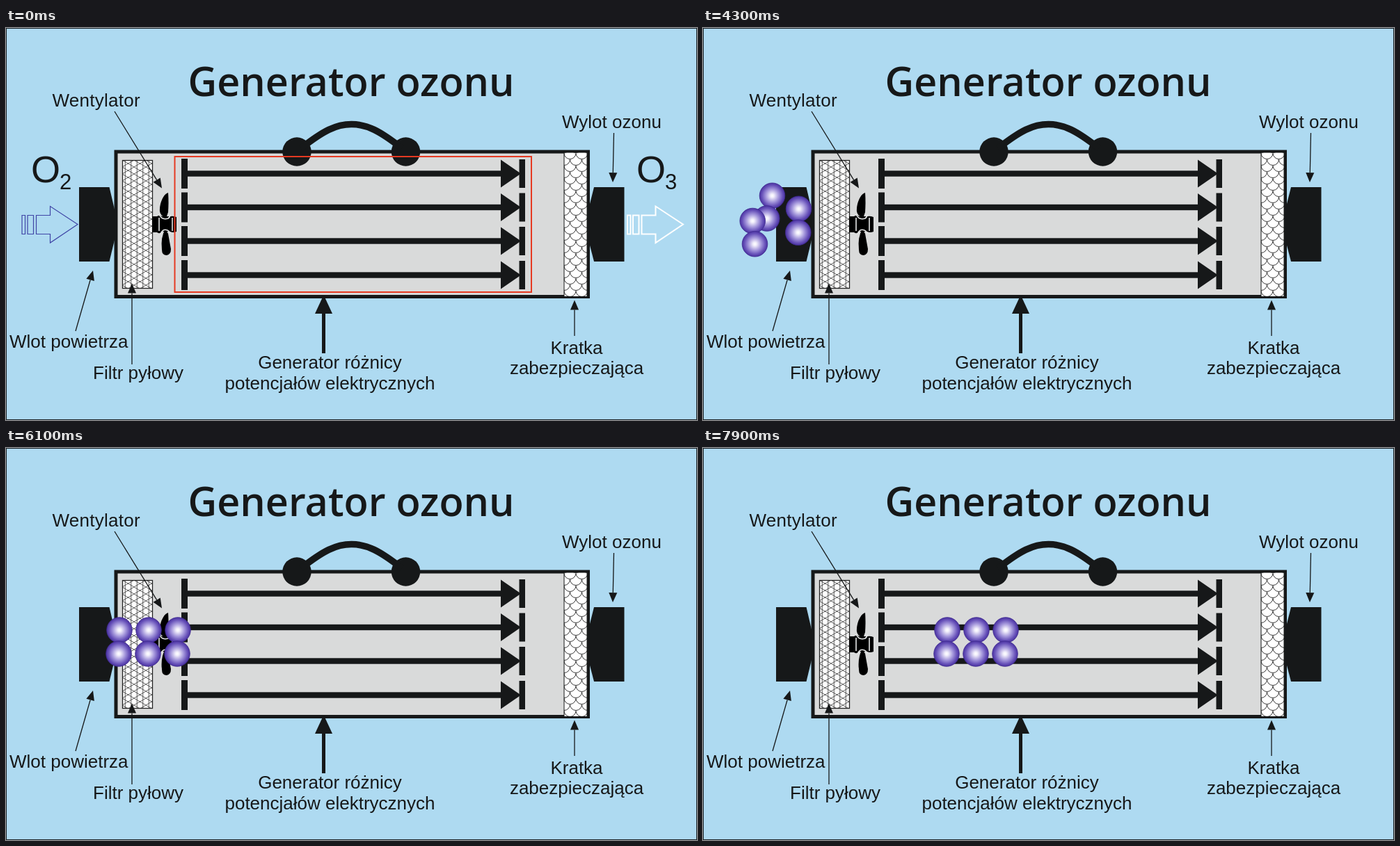
Recreate the animation shown at these times as an HTML page. Size 993 by 564 pixels, loop 8 s.

```html
<!DOCTYPE html>
<html lang="pl">
<head>
<meta charset="utf-8">
<title>Generator ozonu</title>
<style>
html, body { margin: 0; width: 100%; height: 100%; overflow: hidden; background: #aedaf1; }
svg { display: block; width: 993px; height: 564px; }
text { font: 26px "Liberation Sans", Arial, sans-serif; fill: #161819; white-space: pre; }
.title { font: 600 57.5px "Open Sans", "Noto Sans", sans-serif; }
.mid { text-anchor: middle; }
</style>
</head>
<body>
<svg viewBox="0 0 993 564">
  <defs>
    <radialGradient id="shade">
      <stop offset="0" stop-color="#fff"/>
      <stop offset=".14" stop-color="#f1eefb"/>
      <stop offset=".5" stop-color="#a598dc"/>
      <stop offset=".82" stop-color="#6650b8"/>
      <stop offset="1" stop-color="#4a32a0"/>
    </radialGradient>
    <pattern id="mesh" x="167" y="190" width="17" height="10" patternUnits="userSpaceOnUse">
      <path d="M0 0L17 10M0 10L17 0M4.25 0V10M12.75 0V10" stroke="#333" stroke-width=".8"/>
    </pattern>
    <pattern id="scales" x="802" y="180" width="17" height="18" patternUnits="userSpaceOnUse">
      <path d="M0 0A8.5 8.5 0 0 0 17 0M-8.5 9A8.5 8.5 0 0 0 8.5 9A8.5 8.5 0 0 0 25.5 9"
        fill="none" stroke="#222" stroke-width=".9"/>
    </pattern>
    <circle id="ball" r="18.3" fill="url(#shade)" stroke="#3f2a90" stroke-width=".8"/>
    <path id="flow" d="M23 269.5h4.5v27h-4.5zM31 269.5h8.500v27h-8.500zM43.500 269.500H63.500V256.500L103 282.500L63.500 309V296.500H43.500z" fill="none"/>
  </defs>

  <rect width="993" height="564" fill="#aedaf1"/>
  <rect x=".5" y=".5" width="992" height="563" fill="none" stroke="#1c2328"/>

  <g fill="#161819">
    <path d="M105 229H148.500L156 261V305L148.500 336H105z"/>
    <path d="M888.500 229H845L837 261V305L845 336H888.500z"/>
  </g>
  <rect x="158" y="178" width="678.500" height="208.500" fill="#d9dada" stroke="#161819" stroke-width="5"/>

  <rect x="802" y="179" width="33" height="207.500" fill="#fff"/>
  <rect x="802" y="179" width="33" height="207.500" fill="url(#scales)" stroke="#161819"/>
  <rect x="167.500" y="190.500" width="43" height="184" fill="#fff"/>
  <rect x="167.500" y="190.500" width="43" height="184" fill="url(#mesh)" stroke="#222" stroke-width="1.300"/>

  <g>
    <path d="M210 271H217Q221 268 224 271H236Q240 270 245 272V293Q240 295 236 293H224Q221 297 217 294H210z"/>
    <path d="M233 237C227 238 220 252 221 264Q222 270 230 274L233 265Q234 250 233 237z"/>
    <path d="M229 289Q222 301 224 319Q224 327 231 327Q237 326 237 318L233 296z"/>
    <path d="M220 268Q224 277 233 274Q236 272 236 268M222 297Q225 288 232 291Q236 293 236 297M220 273V292M239 273V292"
      fill="none" stroke="#e4e5e5" stroke-width="1.600"/>
  </g>

  <g id="diodes" fill="#161819"></g>

  <g fill="#161819">
    <circle cx="418" cy="178" r="20.700"/>
    <circle cx="574.500" cy="178" r="20.700"/>
    <path d="M424 173C456 148 474 138.500 496.500 138.500S537 148 569 173" fill="none" stroke="#161819" stroke-width="9.500"/>
  </g>

  <g id="pointers" fill="#161819" stroke="#161819"></g>

  <text class="title mid" x="496" y="98">Generator ozonu</text>
  <text x="66.500" y="112.500" letter-spacing=".25">Wentylator</text>
  <text x="799" y="143.500">Wylot ozonu</text>
  <text x="5" y="459.500">Wlot powietrza</text>
  <text x="125" y="504.500">Filtr pyłowy</text>
  <text class="mid" x="465.500" y="490">Generator różnicy</text>
  <text class="mid" x="465.500" y="519.500">potencjałów elektrycznych</text>
  <text class="mid" x="820" y="468.500">Kratka</text>
  <text class="mid" x="820" y="497.500">zabezpieczająca</text>

  <g id="intro">
    <rect x="242.500" y="185" width="512.500" height="195" fill="none" stroke="#e63a22" stroke-width="2"/>
    <use href="#flow" stroke="#3f45a6" stroke-width="1.200"/>
    <use href="#flow" x="870" stroke="#fff" stroke-width="2"/>
    <text x="36" y="222" style="font-size:54px">O</text>
    <text x="77" y="232" style="font-size:31px">2</text>
    <text x="906" y="222" style="font-size:54px">O</text>
    <text x="947" y="232" style="font-size:31px">3</text>
  </g>
  <g id="count">
    <text x="8.500" y="181" style="font-size:39.500px">3xO</text>
    <text x="80.500" y="188" style="font-size:21.500px">2</text>
  </g>
  <g id="balls"></g>
</svg>
<script>
const $ = id => document.getElementById(id);
const LOOP = 8000, SHOW = 500, START = 3500, STEP = 200, ALIGNED = 5100;

$('diodes').innerHTML = [209.5, 258, 306.5, 355.5].map(y => `
  <rect x="252" y="${y - 21.5}" width="9" height="43"/>
  <rect x="260" y="${y - 4.2}" width="454" height="8.400"/>
  <path d="M711 ${y - 20}L740 ${y}L711 ${y + 20}z"/>
  <rect x="737.500" y="${y - 20.5}" width="8.500" height="41"/>`).join('');

// Line from tail to tip with a filled triangular head.
function pointer(x1, y1, x2, y2, line = 1.3, len = 14, half = 6) {
  const d = Math.hypot(x2 - x1, y2 - y1);
  const u = (x2 - x1) / d, v = (y2 - y1) / d;
  const bx = x2 - u * len, by = y2 - v * len;
  return `<path stroke-width="${line}" d="M${x1} ${y1}L${bx} ${by}"/>
    <path stroke="none" d="M${x2} ${y2}L${bx - v * half} ${by + u * half}L${bx + v * half} ${by - u * half}z"/>`;
}
$('pointers').innerHTML =
  pointer(156, 120, 224, 230.5) +
  pointer(873.5, 151, 872, 222) +
  pointer(100, 436, 125, 349) +
  pointer(181, 484, 181, 367.5) +
  pointer(817, 443, 817, 391.5) +
  pointer(456.5, 468, 456.5, 384, 5, 27, 12.5);

// Each atom: resting place, place as it sets off, place once lined up.
const atoms = [
  [[45, 209], [62, 220.5], [137, 262]],
  [[31, 240], [47.5, 252], [136, 296]],
  [[34, 293], [47.5, 293], [95, 262]],
  [[42, 326.5], [55, 325.5], [94, 296]],
  [[77, 258.5], [96, 258.5], [179, 262]],
  [[76.5, 292.5], [95.5, 292.5], [178, 296]]
];
$('balls').innerHTML = '<use href="#ball"/>'.repeat(atoms.length);
const balls = [...$('balls').children];

// Shared travel to the right after lining up: [time, distance].
const travel = [[ALIGNED, 0], [6100, 68], [6900, 130], [7900, 256]];
const mix = (a, b, k) => a + (b - a) * k;

function shift(t) {
  for (let i = 1; i < travel.length; i++) {
    const [t0, a] = travel[i - 1], [t1, b] = travel[i];
    if (t <= t1) return mix(a, b, Math.max(0, (t - t0) / (t1 - t0)));
  }
  return travel[travel.length - 1][1];
}

function draw(t) {
  const show = (id, on) => $(id).setAttribute('visibility', on ? 'visible' : 'hidden');
  show('intro', t < SHOW);
  show('count', t >= SHOW && t < START);
  show('balls', t >= SHOW);
  const q = START + Math.floor((t - START) / STEP) * STEP;
  const k = Math.min(1, (q - START) / (ALIGNED - START));
  const dx = shift(q);
  atoms.forEach(([rest, from, to], i) => {
    const [x, y] = t < START ? rest : [mix(from[0], to[0], k) + dx, mix(from[1], to[1], k)];
    balls[i].setAttribute('transform', `translate(${x} ${y})`);
  });
}

const begin = performance.now();
function tick() {
  draw((performance.now() - begin) % LOOP);
  requestAnimationFrame(tick);
}
tick();
</script>
</body>
</html>
```
